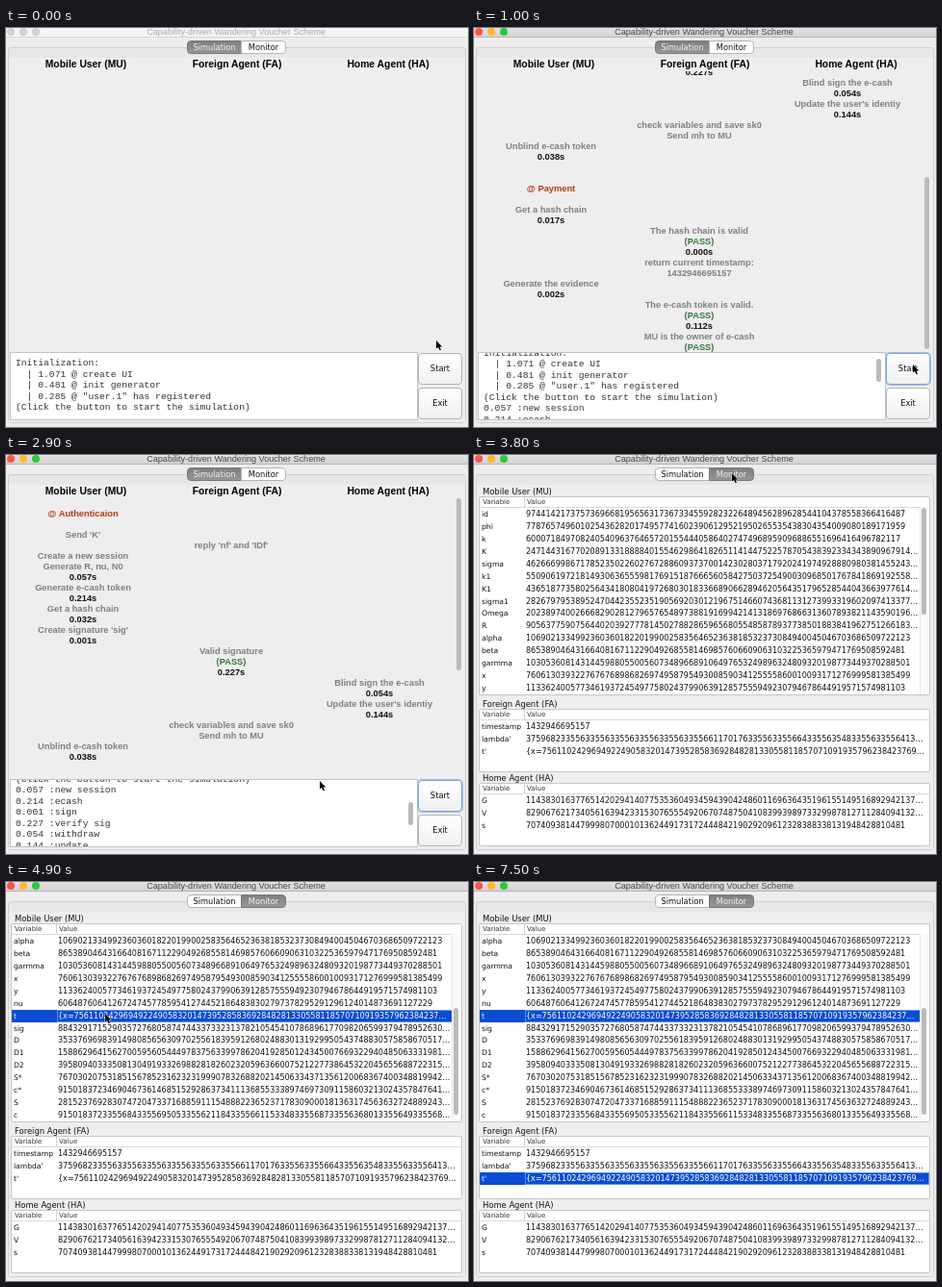
Recreate the animation shown at these times as an HTML page. Size 480 px wide and 415 px high, loop 7600 ms.

```html
<!DOCTYPE html>
<html lang="en">
<head>
<meta charset="utf-8">
<title>Protocol simulation</title>
<style>
html, body { margin: 0; width: 100%; height: 100%; overflow: hidden; background: #ededed; }
#stage { position: relative; width: 480px; height: 415px; overflow: hidden; background: #ededed; font: 8.3px "DejaVu Sans", sans-serif; color: #111; }
#stage div, #stage svg { position: absolute; box-sizing: border-box; }
.text { line-height: 12px; white-space: pre; }
.mid { text-align: center; }
.bar { left: 0; top: 0; width: 480px; height: 10px; background: #f5f5f5; border-bottom: 1px solid #d6d6d6; }
.bar .text { left: 0; top: -2px; width: 478px; font: 9.1px/12px "Liberation Sans", sans-serif; color: #a8a8a8; }
.light { top: 0; width: 8px; height: 8px; border-radius: 50%; background: #d3d3d3; border: 1px solid #c4c4c4; }
.active .bar { background: linear-gradient(#e2e2e2, #d4d4d4); border-color: #b5b5b5; }
.active .bar .text { color: #444; }
.active .light { background: var(--on); border-color: transparent; }
.pane { left: 2px; top: 20px; width: 476px; height: 391px; border: 1px solid #cfcfcf; border-radius: 3px; background: #e7e7e7; }
.inner { left: 3px; top: 31px; width: 474px; height: 379px; background: #eee; }
.tab { top: 13px; height: 14px; line-height: 13px; text-align: center; border: 1px solid #b4b4b4; background: #fff; }
.tab.on { background: linear-gradient(#7f7f7f, #969696); border-color: #777; color: #f4f4f4; }
.head { top: 32px; width: 160px; font: bold 10.35px/12px "Liberation Sans", sans-serif; color: #000; }
.clip { overflow: hidden; }
.step { width: 160px; font: bold 9.3px/12px "Liberation Sans", sans-serif; color: #7f7f7f; }
.step.time { color: #111; }
.step.pass { color: #37783c; }
.step.phase { color: #b53a12; }
.log { left: 4px; top: 337px; width: 424px; height: 71px; background: #fff; border: 1px solid #c2c2c2; }
.log .text { left: 5px; font: 9.68px/12px "Liberation Mono", monospace; color: #333; }
.button { left: 428px; width: 46px; height: 33px; line-height: 31px; text-align: center; border: 1px solid #b3b3b3; border-radius: 4px; background: linear-gradient(#fff, #f0f0f0); }
.focus { border-color: #7fa5dc; box-shadow: 0 0 0 1px #9fbfec; }
.thumb { width: 5px; border-radius: 3px; background: #bababa; }
.rail { background: #fafafa; border-left: 1px solid #e6e6e6; }
.frame { left: 5px; width: 469px; border: 1px solid #c6c6c6; border-radius: 2px; background: #fff; }
.caption { font-size: 8.4px; }
.label { font-size: 7px; color: #333; }
.row { left: 0; height: 13px; line-height: 14.4px; white-space: nowrap; }
.row .key { left: 2px; font-size: 7.6px; }
.row .value { left: 47px; right: 0; height: 13px; padding: 0 2px 0 1px; font-size: 8.05px; overflow: hidden; text-overflow: ellipsis; }
.row.on { background: #0a4cd2; color: #fff; }
.row.on .value { box-shadow: inset 0 0 0 1px #5f8ee6; }
</style>
</head>
<body>
<div id="stage"></div>
<script>
const LOOP = 7600, TICK = 100, ROW = 12.93, LINE = 11.55;
const stage = document.getElementById('stage');

function add(parent, cls, box = {}, text = '') {
  const el = document.createElement('div');
  el.className = cls;
  for (const k in box) el.style[k] = box[k] + 'px';
  el.textContent = text;
  parent.append(el);
  return el;
}
const show = (el, on) => { el.style.display = on ? '' : 'none'; };

// Linear interpolation through [time, ...values] points.
function track(points, t) {
  const i = points.findIndex(p => p[0] > t);
  if (i < 0) return points[points.length - 1].slice(1);
  if (i === 0) return points[0].slice(1);
  const a = points[i - 1], b = points[i], k = (t - a[0]) / (b[0] - a[0]);
  return a.slice(1).map((v, j) => v + (b[j + 1] - v) * k);
}

// Window chrome
add(stage, 'pane');
add(stage, 'inner');
const bar = add(stage, 'bar');
add(bar, 'text mid', {}, 'Capability-driven Wandering Voucher Scheme');
['#f9544d', '#fbb92f', '#30c63f'].forEach((c, i) =>
  add(bar, 'light', { left: 1 + 13 * i }).style.setProperty('--on', c));
const simTab = add(stage, 'tab', { left: 188, width: 57 }, 'Simulation');
const monTab = add(stage, 'tab', { left: 244, width: 47 }, 'Monitor');
simTab.style.borderRadius = '4px 0 0 4px';
monTab.style.borderRadius = '0 4px 4px 0';

// Simulation page: each line is a column and its text, '-' is a gap
const steps = `0 @ Authenticaion
-
0 Send 'K'
1 reply 'nf' and 'IDf'
0 Create a new session
0 Generate R, nu, N0
0 0.057s
0 Generate e-cash token
0 0.214s
0 Get a hash chain
0 0.032s
0 Create signature 'sig'
0 0.001s
1 Valid signature
1 (PASS)
1 0.227s
2 Blind sign the e-cash
2 0.054s
2 Update the user's identiy
2 0.144s
1 check variables and save sk0
1 Send mh to MU
0 Unblind e-cash token
0 0.038s
-
-
0 @ Payment
-
0 Get a hash chain
0 0.017s
1 The hash chain is valid
1 (PASS)
1 0.000s
1 return current timestamp:
1 1432946695157
0 Generate the evidence
0 0.002s
1 The e-cash token is valid.
1 (PASS)
1 0.112s
1 MU is the owner of e-cash
1 (PASS)`.split('\n');
const sim = add(stage, 'sim', { left: 0, top: 0 });
['Mobile User (MU)', 'Foreign Agent (FA)', 'Home Agent (HA)'].forEach((s, i) =>
  add(sim, 'text head mid', { left: [3, 160, 317][i] }, s));
const view = add(sim, 'clip', { left: 3, top: 45, width: 464, height: 292 });
const flow = add(view, '', { left: -3, top: 0 });
const stepEls = steps.map((s, i) => {
  const text = s.slice(2);
  const kind = /^@/.test(text) ? 'phase' : /PASS/.test(text) ? 'pass' : /^\d.*s$/.test(text) ? 'time' : '';
  return add(flow, 'text step mid ' + kind, { left: 154 * s[0] || 0, top: 10 + 11 * i }, text);
});
const simThumb = add(sim, 'thumb', { left: 468, height: 179 });

const logLines = `Initialization:
  | 1.071 @ create UI
  | 0.481 @ init generator
  | 0.285 @ "user.1" has registered
(Click the button to start the simulation)
0.057 :new session
0.214 :ecash
0.001 :sign
0.227 :verify sig
0.054 :withdraw
0.144 :update
0.038 :unblind
0.017 :hash chain
0.000 :verify hash
0.002 :evidence
0.112 :verify token`.split('\n');
const log = add(sim, 'log clip');
const logFlow = add(log, '', { left: 0, top: 0 });
const logEls = logLines.map((s, i) => add(logFlow, 'text', { top: 5 + LINE * i }, s));
const logThumb = add(log, 'thumb', { left: 413, height: 24 });
const start = add(sim, 'button', { top: 338 }, 'Start');
add(sim, 'button', { top: 374 }, 'Exit');

// Monitor page
const mon = add(stage, 'mon', { left: 0, top: 0 });
function table(title, y, height, rowWidth, data) {
  add(mon, 'text caption', { left: 9, top: y - 6 }, title);
  add(mon, 'frame', { top: y + 5, height });
  add(mon, 'text label', { left: 9, top: y + 4.5 }, 'Variable');
  add(mon, 'text label', { left: 55, top: y + 4.5 }, 'Value');
  add(mon, '', { left: 52, top: y + 6, width: 1, height: 10 }).style.background = '#d0d0d0';
  add(mon, '', { left: 6, top: y + 16, width: 467, height: 1 }).style.background = '#dadada';
  const box = add(mon, 'clip', { left: 6, top: y + 16, width: 467, height: height - 12 });
  const body = add(box, '', { left: 0, top: 0 });
  const rows = {};
  data.split('\n').forEach((line, i) => {
    const [key, value] = line.split(' ');
    const row = rows[key] = add(body, 'row', { top: i * ROW + 1, width: rowWidth });
    add(row, 'key', {}, key);
    add(row, 'value', {}, value);
  });
  return { body, rows };
}
const mobile = table('Mobile User (MU)', 38, 207, 458, `id 97441421737573696681956563173673345592823226489456289628544104378558366416487
phi 77876574960102543628201749577416023906129521950265535438304354009080189171959
k 6000718497082405409637646572015544405864027474968959096886551696416496782117
K 247144316770208913318888401554629864182651141447522578705438392334343890967914052
sigma 46266699867178523502260276728860937370014230280371792024197492888098038145524377162
k1 55090619721814930636555981769151876665605842750372549003096850176784186919255836041
K1 43651877358025643418080419726803018336689066289462056435179652854404366397761429053
sigma1 28267979538952470442355235190569203012196751466074368113127399331960209741337706182
Omega 202389740026668290281279657654897388191699421413186976866313607893821143590196024
R 905637759075644020392777814502788286596568055485878937738501883841962751266183907
alpha 106902133499236036018220199002583564652363818532373084940045046703686509722123
beta 86538904643166408167112290492685581469857606609063103225365979471769508592481
garmma 103053608143144598805500560734896689106497653249896324809320198773449370288501
x 76061303932276767689868269749587954930085903412555586001009317127699958138549 9
y 113362400577346193724549775802437990639128575559492307946786449195715749811 03
nu 6064876064126724745778595412744521864838302797378295291296124014873691127229
t {x=7561102429694922490583201473952858369284828133055811857071091935796238423769104
sig 884329171529035727680587474433733231378210545410786896177098206599379478952630418
D 353376969839149808565630970255618395912680248830131929950543748830575858670517742
D1 15886296415627005956054449783756339978620419285012434500766932294048506333198127504
D2 39580940333508130491933269882818260232059636600752122773864532204565568872231506417
S* 767030207531851567852316232319990783268820214506334371356120068367400348819942517
c* 915018372346904673614685152928637341113685533389746973091158603213024357847641180
S 281523769283074720473371688591115488822365237178309000181363174563632724889243306
c 915018372335568433556950533556211843355661153348335568733556368013355649335568721`.replace(/(\d) (\d{1,2})$/gm, '$1$2'));
const foreign = table('Foreign Agent (FA)', 259, 66, 467, `timestamp 1432946695157
lambda' 3759682335563355633556335563355633556611701763355633556643355635483355633556413355672
t' {x=75611024296949224905832014739528583692848281330558118570710919357962384237691045`);
table('Home Agent (HA)', 336, 66, 467, `G 11438301637765142029414077535360493459439042486011696364351961551495168929421370548
V 8290676217340561639423315307655549206707487504108399398973329987812711284094132665
s 70740938144799980700010136244917317244484219029209612328388338131948428810481`);
add(mon, 'rail', { left: 463, top: 54, width: 10, height: 195 });
const monThumb = add(mon, 'thumb', { left: 465, height: 111 });

// Pointer
stage.insertAdjacentHTML('beforeend',
  '<svg width="10" height="14" viewBox="-1 -1 10 14"><path d="M0 0V8.6L2 6.9L3.6 10.3L5 9.7L3.5 6.4H6.2Z" fill="#000" stroke="#fff" stroke-width=".8" paint-order="stroke"/></svg>');
const pointer = stage.lastElementChild;

const pointerPath = [
  [0, 447, 325], [200, 456, 350], [1200, 456, 350], [1500, 375, 228], [1700, 363, 214],
  [2000, 363, 214], [2400, 333, 345], [2900, 326, 339], [3300, 326, 345], [3700, 268, 19],
  [4000, 268, 19], [4300, 240, 150], [4600, 130, 165], [4900, 103, 137], [5200, 103, 137],
  [5600, 100, 306], [6000, 110, 306], [6300, 170, 390], [6700, 215, 298], [6900, 215, 298],
  [7400, -12, -16]
];
const stepCount = [[400, 0], [900, steps.length]];
const flowScroll = [[1100, 180], [1600, 0]];
const logScroll = [[500, 0], [600, 10.5], [2300, 10.5], [2900, 57.5], [3300, 110]];
const tableScroll = [[4200, 0], [4700, 10 * ROW]];

function draw(t) {
  const monitor = t >= 3700, active = t >= 400;
  stage.classList.toggle('active', active);
  simTab.classList.toggle('on', !monitor);
  monTab.classList.toggle('on', monitor);
  show(sim, !monitor);
  show(mon, monitor);
  start.classList.toggle('focus', active);

  const count = Math.floor(track(stepCount, t)[0]);
  const scroll = t < 1100 ? Math.max(0, 11 * count - 282) : track(flowScroll, t)[0];
  stepEls.forEach((el, i) => show(el, i < count));
  flow.style.top = -scroll + 'px';
  show(simThumb, count > 26);
  simThumb.style.top = 45 + scroll * .61 + 'px';

  const logTop = track(logScroll, t)[0];
  logEls.forEach((el, i) => show(el, i < 5 || t >= 500 + 40 * (i - 5)));
  logFlow.style.top = -logTop + 'px';
  show(logThumb, t >= 600);
  logThumb.style.top = 2 + logTop * .36 + 'px';

  const tableTop = track(tableScroll, t)[0];
  mobile.body.style.top = -tableTop + 'px';
  monThumb.style.top = 55 + tableTop * .588 + 'px';
  mobile.rows.t.classList.toggle('on', t >= 4900);
  foreign.rows["t'"].classList.toggle('on', t >= 5600);

  const [x, y] = track(pointerPath, t);
  pointer.style.left = x - 1 + 'px';
  pointer.style.top = y - 1 + 'px';
}

const begin = performance.now();
function loop() {
  const t = (performance.now() - begin) % LOOP;
  draw(Math.floor(t / TICK) * TICK);
  requestAnimationFrame(loop);
}
loop();
</script>
</body>
</html>
```
